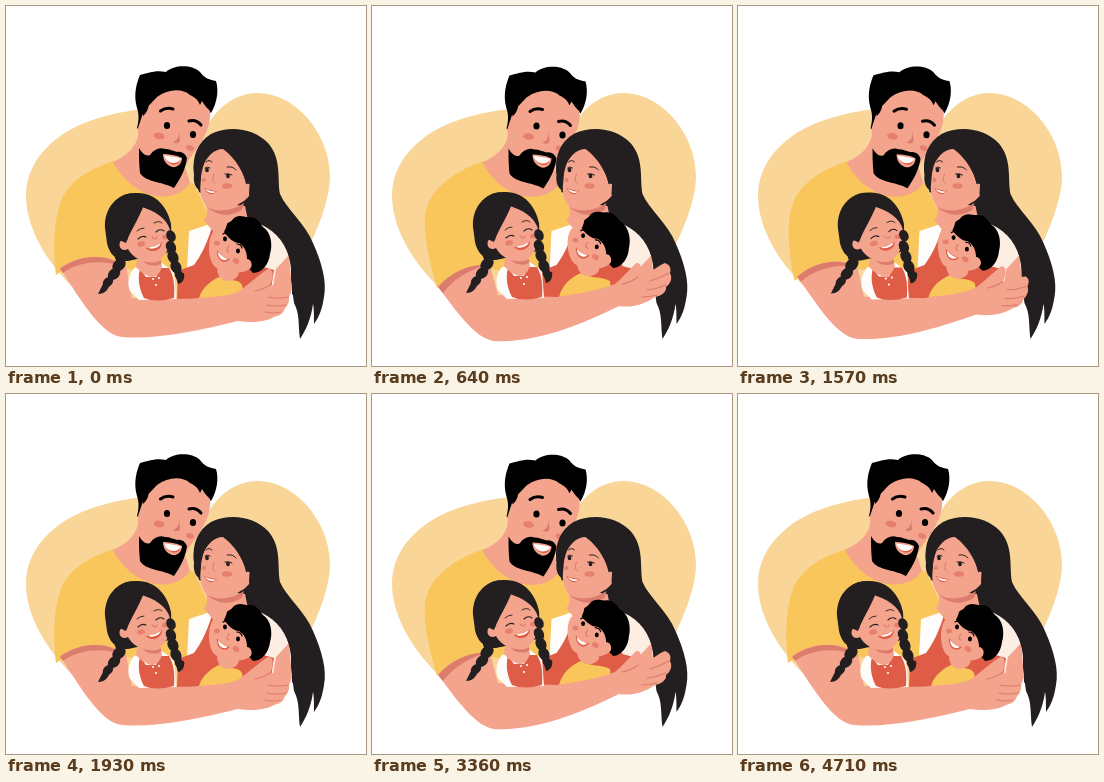
These frames come from a looping animation (360 px wide and 360 px high, 4.78 s). An HTML page with a canvas:

```html
<!DOCTYPE html>
<html lang="en">
<head>
<meta charset="utf-8">
<title>Family hug</title>
<style>
html, body { margin: 0; width: 100%; height: 100%; overflow: hidden; background: #fff; }
canvas { display: block; width: 360px; height: 360px; }
</style>
</head>
<body>
<canvas id="stage"></canvas>
<script>
const LOOP = 4780, FPS = 14;
const SKIN = '#f4a38c', SHADE = '#dc7c6d', BLUSH = '#e67f70', RED = '#df5c47',
  YELLOW = '#f8c65b', HEART = '#f9d598', WHITE = '#fffdfb', CREAM = '#fdeee4',
  HAIR = '#231f20', BLACK = '#000';

const canvas = document.getElementById('stage');
const ctx = canvas.getContext('2d');
const dpr = window.devicePixelRatio || 1;
canvas.width = canvas.height = 360 * dpr;

let hug = 0; // 0 relaxed, 1 squeezed

const smooth = x => {
  x = Math.min(1, Math.max(0, x));
  return x * x * (3 - 2 * x);
};

// One squeeze: tighten, hold, release.
const squeeze = t => smooth(t / 325) * (1 - smooth((t - 1392) / 330));

function blend(a, b) {
  if (!b) return new Path2D(a);
  const to = b.match(/-?[\d.]+/g);
  let i = 0;
  return new Path2D(a.replace(/-?[\d.]+/g, n => +n + (to[i++] - n) * hug));
}

function fill(color, a, b) {
  ctx.fillStyle = color;
  ctx.fill(blend(a, b));
}

function line(color, width, a, b) {
  ctx.strokeStyle = color;
  ctx.lineWidth = width;
  ctx.stroke(blend(a, b));
}

function oval(color, x, y, rx, ry = rx, turn = 0) {
  ctx.fillStyle = color;
  ctx.beginPath();
  ctx.ellipse(x, y, rx, ry, turn, 0, 7);
  ctx.fill();
}

// Shifts a figure (and turns it about a pivot) as the hug tightens.
function figure(dx, dy, draw, turn = 0, px = 0, py = 0) {
  ctx.save();
  ctx.translate(px + dx * hug, py + dy * hug);
  ctx.rotate(turn * hug);
  ctx.translate(-px, -py);
  draw();
  ctx.restore();
}

function heart() {
  fill(HEART, 'M20 190C20 150 55 121 100 110C115 106 127 104 140 103L200 122C212 100 230 87 252 87C292 88 324 130 324 170C324 194 311 224 303 240L280 290L110 300L90 300C60 280 20 235 20 190Z');
}

function shirt() {
  fill(YELLOW,
    'M108 155C85 163 65 172 55 195C46 220 48 250 50 269C70 254 95 250 118 262L185 275L205 215L188 178Z',
    'M112 155C88 163 64 178 56 198C48 215 56 250 65 282C78 269 95 260 115 262L185 275L203 215L186 178Z');
}

function fatherHead() {
  // neck
  fill(SKIN, 'M133 122C133 141 120 150 107 156C114 170 130 187 150 190C166 192 178 186 184 177L178 158Z');
  // hair
  fill(BLACK, 'M131 102C127 88 131 76 134 69C145 66 151 64 160 66C168 59 185 58 194 66C198 72 204 74 210 75C213 85 211 97 205 107L196 99L150 98L136 126L131 122C133 114 133 108 131 102Z');
  // face
  fill(SKIN, 'M138 104C142 101 146 96 151 91C162 83 176 82 184 89C190 92 192 94 194 99L196 95C199 100 202 103 204 105C205 114 202 125 195 136C190 145 184 151 181 157L170 176L136 158L133 145L132 122Z');
  fill(BLACK, 'M136 102C135 96 136 88 140 91C145 98 142 106 137 110Z');
  // beard
  fill(BLACK, 'M133 142C136 147 140 151 144 149C148 143 154 141 159 143C164 143 167 145 171 146C175 145 179 147 181 152C180 160 177 169 168 182C162 179 158 178 150 176C143 174 137 172 134 167C133 158 133 150 133 142Z');
  fill(SKIN, 'M157 148C163 148 170 149 176 152C176 157 172 162 166 161C160 159 157 154 157 148Z');
  fill(RED, 'M159 151C164 155 170 156 174 154C173 161 162 160 159 151Z');
  fill(WHITE, 'M158 149.5C164 150 170 151 175 152.5C173 157 167 158 163 156C160 154 159 152 158 149.5Z');
  oval(BLACK, 161, 119.5, 3.1, 3.5);
  oval(BLACK, 187, 128.5, 3.1, 3.5);
  line(BLACK, 3, 'M154.5 105Q160 101 167 103');
  line(BLACK, 3, 'M183 115Q190 113 195 119');
  oval(BLUSH, 153, 130, 5.5, 3.2, .2);
  oval(BLUSH, 184, 142, 4, 2.6, .4);
  fill(SHADE, 'M173 123Q174 134 167 136Q172 139 174 135Z');
}

function mother() {
  // back hair
  fill(HAIR, 'M188 166C186 150 192 136 205 128C223 119 248 122 262 137C276 153 271 172 274 188C281 204 299 217 307 237C316 257 321 276 318 291C316 304 313 311 308 318C308 310 308 302 307 298C305 313 300 324 294 333C292 319 294 308 288 297L282 254L241 221L210 195L193 186Z');
  // blouse and dress
  fill(WHITE, 'M204 218L183 225L181 264L187 292L240 290L240 218Z');
  fill(CREAM, 'M236 212L256 219C271 226 281 239 285 258L285 285L250 290Z');
  fill(RED, 'M206 221C202 235 195 250 188 259L172 265L171 293L234 292L265 283L268 264L254 260L240 224Z');
  fill(SKIN, 'M270 263L283 249L286 284L266 287Z');
  fill(SKIN, 'M197 195C203 203 202 210 198 214C202 219 207 226 215 234L244 224L239 200Z');
  fill(SHADE, 'M201 201C213 207 226 205 238 197L236 204C222 212 210 209 201 201Z');
  // face
  fill(SKIN, 'M195 158C198 149 206 141 215 141C231 151 238 166 240 178C247 176 248 184 243 190C239 195 236 196 233 198C224 204 207 204 200 198C193 192 194 182 195 173Z');
  fill(HAIR, 'M188 169C186 151 194 136 208 130C225 126 240 142 241 158L241 179C238 170 233 155 217 143C208 143 200 151 197 161C195 168 194 176 193 184C190 182 187 177 188 169Z');
  fill(HAIR, 'M243 188C246 202 256 216 268 224C282 237 287 258 286 288L299 302L304 245L266 178L244 170Z');
  oval(HAIR, 201, 164, 1.9, 2.2);
  oval(HAIR, 222, 170, 1.9, 2.2);
  line(HAIR, 1, 'M219 168Q223 167 226 169');
  line(HAIR, 1, 'M199 162Q201 160 204 162');
  line(HAIR, 1, 'M200 156Q203 153 206 156');
  line(HAIR, 1, 'M221 161Q227 160 230 164');
  oval(BLUSH, 221, 180, 5, 2.8);
  oval(BLUSH, 198, 174, 2, 2);
  line(SHADE, 1, 'M208 168Q205 176 209 177');
  fill(RED, 'M198 182Q204 185 211 185C207 190 201 189 198 182Z');
  fill(WHITE, 'M199 183Q204 185.5 210 185.7C207 188 202 187.5 199 183Z');
}

function boyBody() {
  fill(YELLOW,
    'M193 292C196 281 206 274 215 270C224 276 232 272 236 279L239 294Z',
    'M187 291C191 277 200 271 209 267C218 273 229 270 238 275L239 285Z');
  fill(SKIN,
    'M211 262L232 264C235 270 228 275 221 275C215 274 211 270 211 262Z',
    'M205 257L226 260C230 266 222 271 215 270C209 269 205 264 205 257Z');
}

function boyHead() {
  fill(BLACK, 'M221 222C219 216 225 217 227 213C233 207 239 212 243 211C251 211 253 216 257 221C265 226 267 239 264 248C263 258 256 267 247 267L234 252L221 233Z');
  fill(SKIN, 'M207 226C213 222 220 224 223 227C231 231 239 236 241 246C246 251 249 261 242 264C233 269 216 267 208 260C201 250 202 233 207 226Z');
  fill(BLACK, 'M218 226L222 217L237 214L258 235L252 263L245 265C247 258 245 253 241 253C241 245 238 240 233 237C227 237 222 231 218 226Z');
  oval(BLACK, 219, 233, 2, 2.4);
  oval(BLACK, 232, 245, 2, 2.4);
  line(BLACK, 1.2, 'M217 228Q220 226 223 229');
  line(BLACK, 1.2, 'M231 238Q235 238 236 242');
  oval(BLUSH, 211, 237, 3, 2.3);
  oval(BLUSH, 230, 255, 3.6, 2.6, .6);
  line(SHADE, 1.2, 'M223 240Q219 245 223 246');
  fill(RED, 'M211 244Q215 251 224 253C219 259 210 255 211 244Z');
  fill(WHITE, 'M212 246Q216 251 222 253C218 256 212 253 212 246Z');
}

function arm() {
  fill(SKIN,
    'M54 262C72 249 100 246 120 260L126 292L185 293C205 290 225 292 236 283C246 275 254 268 262 263C268 262 268 272 264 279C272 280 280 278 284 281C287 285 284 288 283 291C284 297 280 301 278 304C277 308 272 310 268 311C260 316 245 317 232 315C195 324 150 334 116 331C96 329 77 298 54 262Z',
    'M66 281C80 265 100 258 118 259L126 289L185 291C205 288 228 284 243 278C250 272 257 264 264 257C270 256 270 263 266 271C278 268 285 260 293 257C299 259 299 264 298 267C301 273 298 278 294 281C295 286 289 290 283 291C272 299 258 302 247 300C215 316 165 338 121 335C104 331 90 313 66 281Z');
  fill(SHADE,
    'M54 263C72 249 100 246 118 261C100 254 75 254 57 267Z',
    'M66 281C80 265 98 258 114 259C95 265 82 273 71 287Z');
  const fingers = [
    ['M262 291Q272 293 282 291', 'M278 275Q288 272 297 267'],
    ['M261 299Q270 301 280 299', 'M275 284Q285 283 294 279'],
    ['M259 306Q267 308 274 306', 'M270 291Q277 291 285 289'],
    ['M264 279Q256 284 249 285', 'M266 271Q258 277 250 278']
  ];
  for (const [a, b] of fingers) line(SHADE, 1.1, a, b);
}

function girl() {
  // left braid
  const left = [[116, 249, 8], [113, 259, 7.5], [108, 268, 7], [102, 276, 5.8]];
  for (const [x, y, r] of left) oval(HAIR, x, y, r, r * .75, -.75);
  fill(HAIR, 'M106 275C102 284 99 288 92 288C94 284 96 280 98 276Z');
  // clothes
  fill(WHITE, 'M128 262C122 270 121 278 124 285L133 294L170 293L168 266L156 257Z');
  fill(RED, 'M134 263C131 274 134 284 138 292Q150 297 168 292C169 281 168 270 163 262L154 262L150 271L140 271Z');
  fill(SKIN, 'M132 247L154 250L156 261C153 270 147 273 142 270C137 268 133 264 130 261Z');
  fill(SHADE, 'M133 249C141 257 149 258 155 254L155 258C145 262 137 258 133 249Z');
  oval(WHITE, 147, 273, 1.1);
  oval(WHITE, 153, 272, 1.1);
  oval(WHITE, 150, 279, 1.1);
  // head
  fill(HAIR, 'M99 222C98 203 110 187 130 187C150 186 162 202 165 218C166 229 163 239 164 246L122 255C110 256 103 247 101 237Z');
  fill(SKIN, 'M136 201C148 205 161 212 164 224C167 238 160 252 149 256C137 258 126 251 122 243C116 246 112 241 114 236C117 232 120 233 121 235C124 222 128 211 136 201Z');
  fill(HAIR, 'M138 199C132 214 124 226 120 237L111 233L119 204L135 194C151 195 163 207 165 221C158 207 148 205 138 199Z');
  line(HAIR, 1, 'M110 195Q119 186 130 188');
  line(HAIR, 1.1, 'M132 233Q136 229 140 231');
  line(HAIR, 1.1, 'M150 226Q154 222 158 225');
  line(HAIR, .9, 'M131 225Q134 222 138 222');
  line(HAIR, .9, 'M148 217Q153 214 156 217');
  oval(BLUSH, 135, 238, 4, 2.6, -.2);
  oval(BLUSH, 159, 231, 3, 2.4, -.2);
  line(SHADE, 1.1, 'M146 231Q150 235 151 231');
  fill(RED, 'M140 242Q149 241 156 236C156 245 145 248 140 242Z');
  fill(WHITE, 'M142 241.8Q149 241 155 237C153 242 146 244 142 241.8Z');
  // right braid
  const right = [[165, 230, 6], [165, 241, 6.5], [167, 251, 7], [170, 261, 7], [173, 269, 5.5]];
  for (const [x, y, r] of right) oval(HAIR, x, y, r * .75, r, -.45);
  fill(HAIR, 'M169 268L178 267C179 272 177 277 172 278Z');
}

function draw(ms) {
  const t = Math.floor((ms % LOOP + 5) * FPS / 1000) * 1000 / FPS;
  hug = t < 3000 ? squeeze(t) : squeeze(t - 3000);
  ctx.setTransform(dpr, 0, 0, dpr, 0, 0);
  ctx.lineCap = ctx.lineJoin = 'round';
  ctx.fillStyle = '#fff';
  ctx.fillRect(0, 0, 360, 360);
  heart();
  shirt();
  figure(3.5, .5, fatherHead);
  figure(-3.5, 0, mother);
  boyBody();
  figure(-7.5, -4, boyHead, -.06, 230, 240);
  arm();
  figure(2, -1, girl);
}

const start = performance.now();
function tick() {
  draw(performance.now() - start);
  requestAnimationFrame(tick);
}
tick();
</script>
</body>
</html>
```
